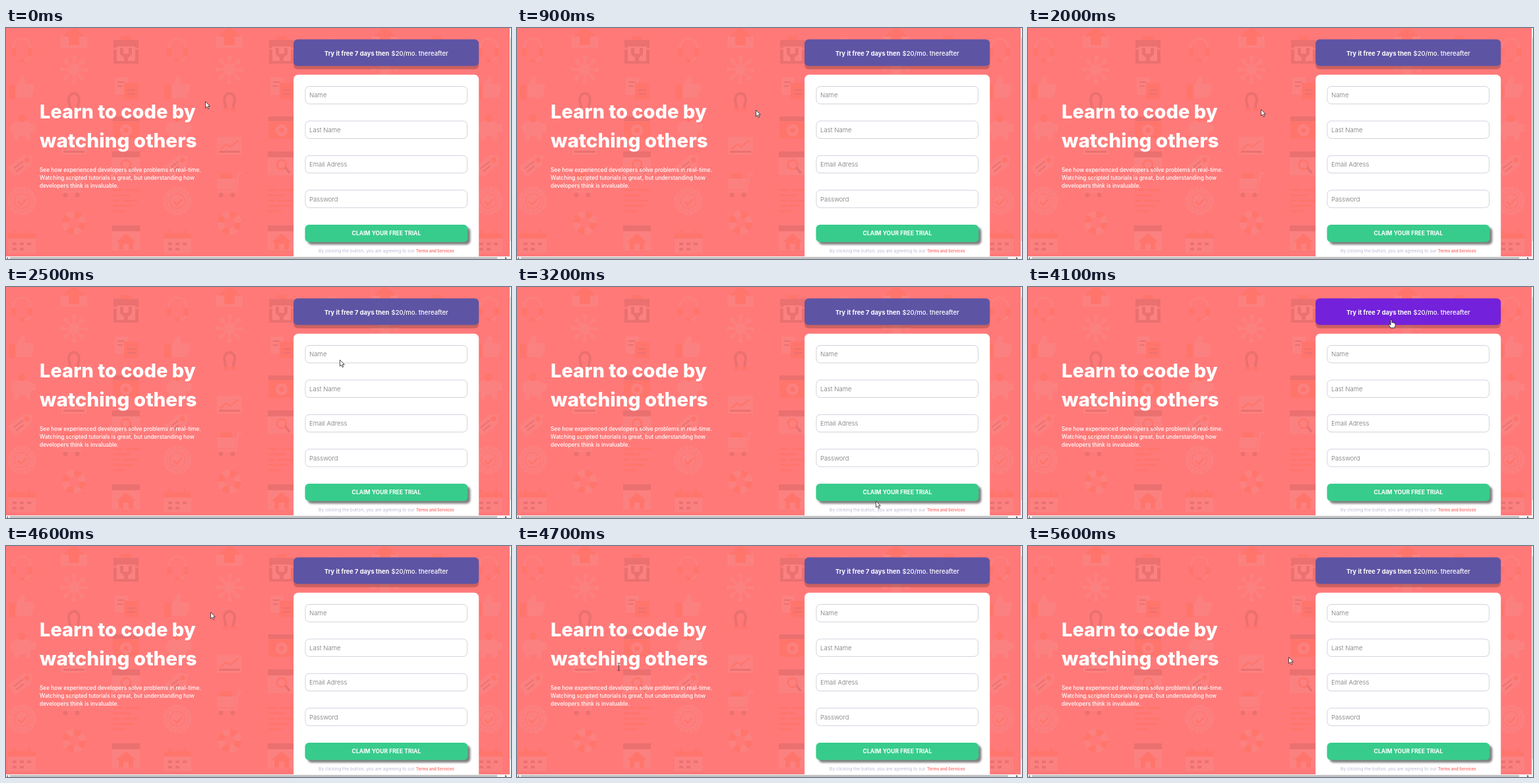
Recreate the animation shown at these times as an HTML page. Size 766 px wide and 350 px high, loop 8000 ms.

```html
<!DOCTYPE html>
<html lang="en">
<head>
<meta charset="utf-8">
<title>Sign-up form</title>
<style>
html, body { margin: 0; width: 100%; height: 100%; overflow: hidden; background: #ff7979; }
svg { display: block; width: 100%; height: 100%; }
text { font-family: Inter, "Open Sans", sans-serif; fill: #fff; }
.title { font-weight: 800; }
.intro { font-size: 8.32px; font-weight: 500; }
.bold { font-weight: 700; }
.field { fill: #fff; stroke: #d3d1dc; }
.hint { font-size: 9.6px; font-weight: 300; fill: #757575; }
#banner { filter: drop-shadow(0 5px .6px rgba(0, 0, 0, .2)); }
#button { filter: drop-shadow(4px 4px 1.5px #808080); }
.dark { fill: #422; }
.orange { fill: #ff5200; }
.light { fill: #d4bfb0; }
.line { fill: none; stroke: #d4bfb0; stroke-width: 2.5; }
.ring { fill: none; stroke: #ff5200; stroke-width: 6; }
</style>
</head>
<body>
<svg viewBox="0 0 766 350">
  <defs>
    <pattern id="icons" width="236" height="350" patternUnits="userSpaceOnUse">
      <g opacity=".11">
        <!-- headset -->
        <g transform="translate(24 33)">
          <path class="line" d="M-13 6V-4a13 13 0 0 1 26 0V6q0 10-11 11"/>
          <path class="orange" d="M-16-2h7V10h-7zM9-2h7V10H9zM-4 14h8v5h-8z"/>
        </g>
        <!-- thumbs up -->
        <g transform="translate(24 91)">
          <path class="light" d="M-8-4L0-18q7 0 4 12h13q3 3 1 9l-4 12H-8z"/>
          <path class="orange" d="M-20-5h10v22h-10z"/>
        </g>
        <!-- piggy bank -->
        <g transform="translate(24 152)">
          <ellipse class="light" rx="17" ry="12"/>
          <path class="light" d="M-12 6h7v12h-7zM6 6h7v12H6zM14-6h7V5h-7z"/>
          <circle class="orange" cy="-15" r="6"/>
        </g>
        <!-- price tag -->
        <g transform="translate(24 206) rotate(-38)">
          <path class="light" d="M-20-9H10L20 0 10 10h-30z"/>
          <path class="dark" d="M-14-3H4v2H-14zM-14 3H0v2h-14z"/>
          <circle class="orange" cx="10" r="4"/>
        </g>
        <!-- rosette -->
        <g transform="translate(24 262)">
          <circle class="line" r="19" style="stroke-width:5" stroke-dasharray="6 1.46"/>
          <circle class="line" r="14"/>
          <circle class="light" r="10"/>
          <path class="orange" d="M-5 0l4 4 7-8 2 2-9 10-6-6z"/>
        </g>
        <!-- calendar -->
        <g transform="translate(24 325)">
          <path class="light" d="M-21-14h42v30h-42z"/>
          <path class="orange" d="M-21-14h42v8h-42zM-13-19h4v8h-4zM9-19h4v8H9z"/>
          <path class="dark" d="M-14 0h6v4h-6zM-3 0h6v4h-6zM8 0h6v4H8zM-14 8h6v4h-6zM-3 8h6v4h-6z"/>
        </g>
        <!-- upload -->
        <g transform="translate(103 8)">
          <path class="light" d="M-20 4h40v18h-40z"/>
          <path class="orange" d="M0-11L17 5H8V18H-8V5h-9z"/>
        </g>
        <!-- network -->
        <g transform="translate(103 63)">
          <path class="line" d="M-17 0h34M0-17v34M-13-13l26 26M13-13l-26 26"/>
          <circle class="line" r="18" style="stroke-width:6" stroke-dasharray="6 8.14" stroke-dashoffset="3"/>
          <circle class="light" r="8"/>
        </g>
        <!-- horseshoe -->
        <g transform="translate(103 112)">
          <path class="line" style="stroke:#422;stroke-width:4" d="M-5 13L-8-4a8 9 0 0 1 16 0L5 13"/>
          <path class="orange" d="M-10 9h8v5h-8zM2 9h8v5H2z"/>
        </g>
        <!-- chart -->
        <g transform="translate(103 178)">
          <path class="light" d="M-19-13h38v27h-38z"/>
          <path class="dark" d="M-16 8h32v3h-32z"/>
          <path class="line" style="stroke:#ff5200" d="M-14 6l9-8 6 4L14-8"/>
        </g>
        <!-- cart -->
        <g transform="translate(103 237)">
          <path class="line" d="M20-17h-6L9 11h-27"/>
          <path class="light" d="M-19-9h29L7 7h-25z"/>
          <path class="orange" d="M-14-17H3v8h-17z"/>
          <circle class="dark" cx="-13" cy="16" r="3.5"/>
          <circle class="dark" cx="5" cy="16" r="3.5"/>
        </g>
        <!-- lifebuoy -->
        <g transform="translate(103 295)">
          <circle class="line" r="13" style="stroke-width:10"/>
          <circle class="ring" r="13" style="stroke-width:10" stroke-dasharray="10.21"/>
        </g>
        <!-- toolbox -->
        <g transform="translate(182 34)">
          <path class="dark" d="M-19-16h38v12h-38zM-19-1h38v21h-38z"/>
          <path class="light" d="M-14-6h28V16h-28z"/>
          <path class="dark" d="M-9-4h5v9h8v-9h5v10L3 11v6h-6v-6l-6-5z"/>
          <path class="orange" d="M-8-22H8v6H-8z"/>
        </g>
        <!-- documents -->
        <g transform="translate(182 92)">
          <path class="light" d="M-17-17H3V9h-20z"/>
          <path class="orange" d="M-3-9h22v25H-3z"/>
          <path class="dark" d="M-13-11h10v2h-10zM-13-5h8v2h-8zM2 1h12v2H2zM2 7h12v2H2z"/>
        </g>
        <!-- shop -->
        <g transform="translate(182 151)">
          <path class="dark" d="M-20-17h40v7h-40z"/>
          <path class="orange" d="M-20-10h40v27h-40z"/>
          <circle class="light" cy="4" r="9"/>
          <circle class="orange" cy="4" r="4"/>
        </g>
        <!-- search window -->
        <g transform="translate(182 205)">
          <path class="light" d="M-21-18h42v36h-42z"/>
          <path class="dark" d="M-21-18h42v9h-42z"/>
          <circle class="ring" cy="2" r="7" style="stroke-width:3"/>
          <path class="dark" d="M4 7l3-2 7 9-3 2z"/>
        </g>
        <!-- code lines -->
        <path class="orange" transform="translate(182 262)" d="M-20-18h15v3h-15zM-1-18h21v3H-1zM-20-10h26v3h-26zM-20-2h10v3h-10zM-6-2h24v3H-6zM-20 6h32v3h-32zM-20 14h20v3h-20z"/>
        <!-- home window -->
        <g transform="translate(182 318)">
          <path class="light" d="M-21-19h42v38h-42z"/>
          <path class="dark" d="M-21-19h42v9h-42z"/>
          <path class="orange" d="M0-7L15 6h-4v12H4V9h-8v9h-7V6h-4z"/>
        </g>
      </g>
    </pattern>
  </defs>

  <rect width="766" height="350" fill="#ff7979"/>
  <rect width="766" height="350" fill="url(#icons)"/>

  <text class="title" x="51" y="137" font-size="29">Learn to code by</text>
  <text class="title" x="51" y="180.5" font-size="29.6">watching others</text>
  <text class="intro" x="51" y="218">See how experienced developers solve problems in real-time.</text>
  <text class="intro" x="51" y="230">Watching scripted tutorials is great, but understanding how</text>
  <text class="intro" x="51" y="242">developers think is invaluable.</text>

  <rect id="banner" x="436.2" y="17.2" width="281" height="40.3" rx="6"/>
  <text class="bold" x="483" y="42.3" font-size="9.3">Try it free 7 days then</text>
  <text x="584.5" y="42.3" font-size="9.55" font-weight="500">$20/mo. thereafter</text>

  <rect x="436.2" y="70.7" width="281" height="300" rx="7" fill="#fff"/>
  <g id="fields"></g>
  <rect id="button" x="453.5" y="298" width="246.800" height="26.200" rx="6"/>
  <text x="577" y="314.2" text-anchor="middle" font-size="8.6" font-weight="700">CLAIM YOUR FREE TRIAL</text>
  <text x="474" y="340" font-size="6.7" style="fill:#bab7d4">By clicking the button, you are agreeing to our</text>
  <text class="bold" x="622" y="340" font-size="5.97" style="fill:#ff7979">Terms and Services</text>

  <path fill="#f3f3f3" d="M764 0h2v350H0v-4h764z"/>
  <path fill="#c1c1c1" d="M765 15h1v308h-1zM6 347h739v3H6z"/>
  <path fill="#505050" d="M1 349l2-2v3zM757 347l3 2-3 1z"/>

  <g id="cursor" stroke-linejoin="round">
    <path id="arrow" fill="#fff" stroke="#222" stroke-width=".8" d="M.5.5V10l2.2-2 1.6 3.6 1.6-.7L4.3 7.4h3z"/>
    <path id="beam" fill="none" stroke="#333" stroke-width=".9" d="M-2-5.5H-.6L0-5 .6-5.5H2M0-5V5M-2 5.5H-.6L0 5 .6 5.5H2"/>
    <path id="hand" fill="#fff" stroke="#222" stroke-width=".9" d="M-1 .8Q0-.6 1 .8V5q1.2-1 2 .3 1.2-.6 1.8.5 1.4-.3 1.4 1.2V9.5L5 13H-1L-3.7 8.5q-.2-1.7 1.3-1L-1 8.7z"/>
  </g>
</svg>
<script>
const LOOP = 8000;
const byId = id => document.getElementById(id);

byId("fields").innerHTML = ["Name", "Last Name", "Email Adress", "Password"].map((label, i) => {
  const y = 88.5 + i * 52.4;
  return `<rect class="field" x="454" y="${y}" width="245.5" height="26.5" rx="6"/>
    <text class="hint" x="460" y="${y + 16.8}">${label}</text>`;
}).join("");

// Pointer samples: time, x, y, shape, hovered element
const steps = [
  [0, 302, 111, "arrow"],
  [500, 345, 131, "arrow"],
  [700, 363, 136, "arrow"],
  [900, 362, 124, "arrow"],
  [2000, 353, 123, "arrow"],
  [2100, 371, 121, "arrow"],
  [2200, 410, 118, "arrow"],
  [2300, 453, 115, "arrow"],
  [2400, 490, 112, "arrow"],
  [2500, 506, 110, "arrow"],
  [2700, 513.5, 92, "beam"],
  [2900, 516, 125, "arrow"],
  [3000, 525, 190, "arrow"],
  [3100, 537, 276, "arrow"],
  [3200, 544, 324, "arrow"],
  [3400, 547.5, 313, "hand", "button"],
  [4100, 551, 49, "hand", "banner"],
  [4200, 551, 43, "hand", "banner"],
  [4300, 549, 39, "hand", "banner"],
  [4400, 546, 38, "hand", "banner"],
  [4600, 310, 100, "arrow"],
  [4700, 154.5, 183, "beam"],
  [5000, 417, 168, "arrow"],
  [5200, 413, 161, "arrow"],
  [5300, 407, 162, "arrow"],
  [5400, 401, 164, "arrow"],
  [5500, 397, 166, "arrow"],
  [5600, 395, 168, "arrow"]
];

function draw(now) {
  const time = now % LOOP;
  const [, x, y, shape, hovered] = steps.findLast(step => step[0] <= time);
  byId("cursor").setAttribute("transform", `translate(${x} ${y})`);
  for (const id of ["arrow", "beam", "hand"])
    byId(id).style.display = id === shape ? "" : "none";
  byId("banner").style.fill = hovered === "banner" ? "#7321db" : "#5e54a4";
  byId("button").style.fill = hovered === "button" ? "#76e2b3" : "#38cc8c";
}

const start = performance.now();
function frame() {
  draw(performance.now() - start);
  requestAnimationFrame(frame);
}
frame();
</script>
</body>
</html>
```
